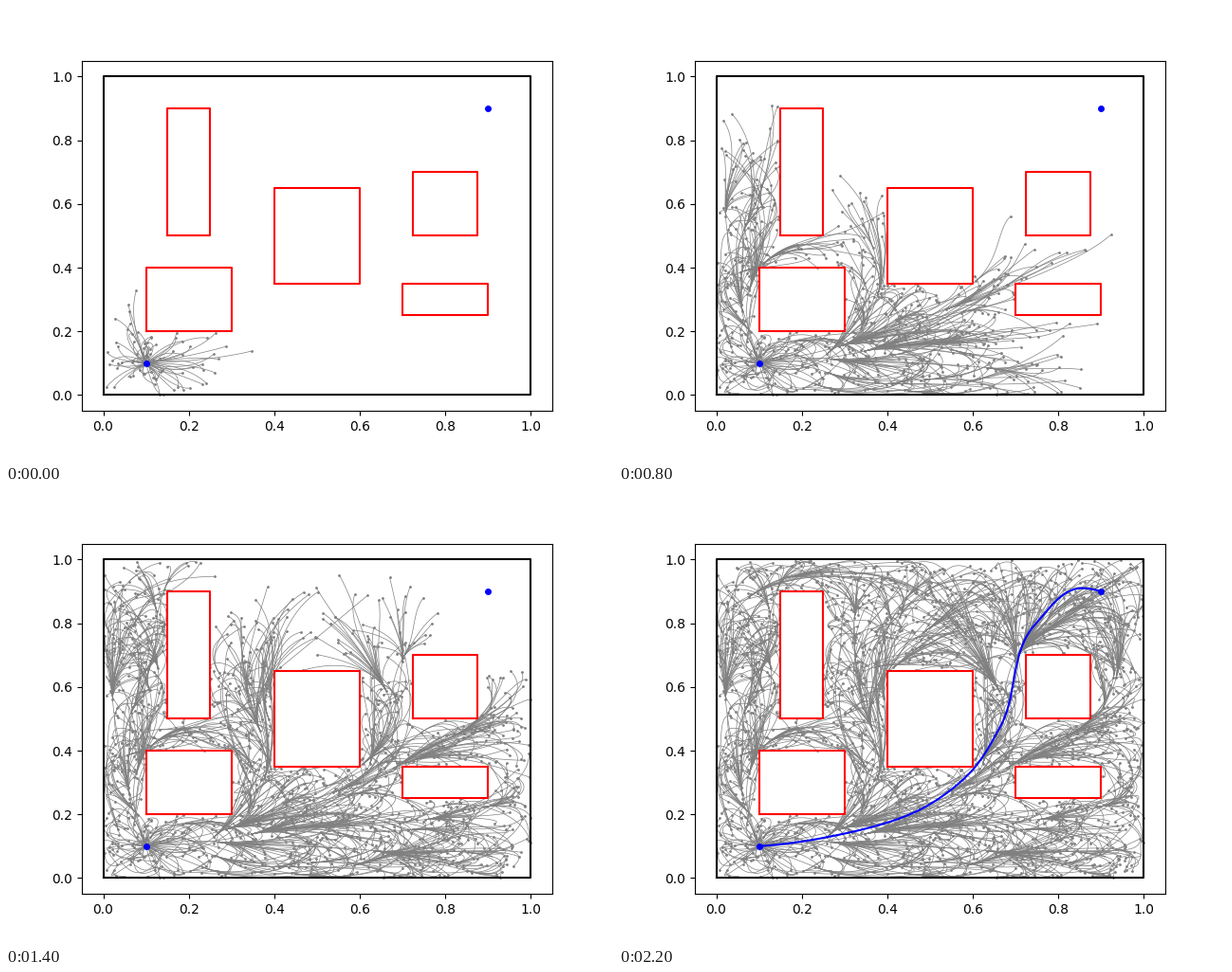
A matplotlib script for the animation above (2.4 s loop, 640x480 px).

```python
import numpy as np
import matplotlib.pyplot as plt
from matplotlib.animation import FuncAnimation
from matplotlib.collections import LineCollection

FRAMES, INTERVAL = 12, 200
COUNT, V_MAX, RADIUS = 2000, 0.33, 1.2
START, GOAL = (0.1, 0.1), (0.9, 0.9)

# Obstacles as x0, y0, x1, y1
BOXES = [(0.15, 0.5, 0.25, 0.9), (0.1, 0.2, 0.3, 0.4), (0.4, 0.35, 0.6, 0.65),
         (0.725, 0.5, 0.875, 0.7), (0.7, 0.25, 0.9, 0.35)]

ROUTE = np.array([START, (0.25, 0.126), (0.5, 0.232), (0.593, 0.33),
                  (0.664, 0.475), (0.748, 0.8), (0.855, 0.91), GOAL])


def blocked(p):
    """Mask of points that lie outside the room or inside an obstacle."""
    x, y = p[..., 0], p[..., 1]
    bad = (x < 0) | (x > 1) | (y < 0) | (y > 1)
    for x0, y0, x1, y1 in BOXES:
        bad |= (x > x0) & (x < x1) & (y > y0) & (y < y1)
    return bad


def hermite(p0, m0, p1, m1, n=20):
    """Cubic curves for stacked end points and end tangents."""
    s = np.linspace(0, 1, n)[:, None]
    p0, m0, p1, m1 = (a[:, None, :] for a in (p0, m0, p1, m1))
    return ((2 * s**3 - 3 * s**2 + 1) * p0 + (s**3 - 2 * s**2 + s) * m0
            + (3 * s**2 - 2 * s**3) * p1 + (s**3 - s**2) * m1)


def sample_states():
    """Random free positions with velocities; the start at rest comes first."""
    rng = np.random.default_rng(4)
    pos = rng.uniform(0, 1, (2 * COUNT, 2))
    pos = pos[~blocked(pos)][:COUNT]
    vel = rng.uniform(-V_MAX, V_MAX, pos.shape)
    return np.vstack([START, GOAL, pos]), np.vstack([np.zeros((2, 2)), vel])


def steer_costs(pos, vel):
    """Best time + energy cost and duration between all pairs of states."""
    d = pos[None] - pos[:, None]
    dist = (d**2).sum(-1)
    along = (d * (vel[:, None] + vel[None])).sum(-1)
    sq = (vel**2).sum(-1)
    speed = sq[:, None] + sq[None] + vel @ vel.T
    best = np.full(dist.shape, np.inf)
    time = np.zeros(dist.shape)
    for t in np.linspace(0.06, RADIUS, 26):
        c = t + 12 * dist / t**3 - 12 * along / t**2 + 4 * speed / t
        better = c < best
        best[better] = c[better]
        time[better] = t
    best[best > RADIUS] = np.inf
    np.fill_diagonal(best, np.inf)
    return best, time


def grow_tree(pos, vel):
    """Fast marching tree: curves, tips and the wave cost that added each."""
    cost_to, time = steer_costs(pos, vel)
    cost_from = cost_to.T.copy()
    n = len(pos)
    cost = np.full(n, np.inf)
    cost[0] = 0
    fresh = np.ones(n, bool)
    fresh[0] = False
    front = ~fresh
    curves, tips, births = [], [], []
    while front.any():
        z = np.argmin(np.where(front, cost, np.inf))
        near = np.flatnonzero(fresh & np.isfinite(cost_to[z]))
        if len(near):
            total = cost_from[near] + np.where(front, cost, np.inf)
            par = total.argmin(1)
            t = time[par, near][:, None]
            arcs = hermite(pos[par], t * vel[par], pos[near], t * vel[near])
            ok = ~blocked(arcs).any(1)
            new = near[ok]
            cost[new] = total.min(1)[ok]
            fresh[new] = False
            front[new] = True
            curves.extend(arcs[ok])
            tips.extend(pos[new])
            births.extend([cost[z]] * len(new))
        front[z] = False
    return curves, np.array(tips), np.array(births)


def smooth(pts):
    s = np.r_[0, np.cumsum(np.hypot(*np.diff(pts, axis=0).T))]
    m = np.gradient(pts, s, axis=0, edge_order=2)
    h = np.diff(s)[:, None]
    return hermite(pts[:-1], h * m[:-1], pts[1:], h * m[1:]).reshape(-1, 2)


def draw_box(x0, y0, x1, y1, color):
    ax.plot([x0, x1, x1, x0, x0], [y0, y0, y1, y1, y0], color=color, lw=1.5)


curves, tips, births = grow_tree(*sample_states())
last_wave = np.quantile(births, 0.98)

fig, ax = plt.subplots(figsize=(6.4, 4.8), dpi=100)
ax.set_xlim(-0.05, 1.05)
ax.set_ylim(-0.05, 1.05)
draw_box(0, 0, 1, 1, "black")
for box in BOXES:
    draw_box(*box, "red")

branches = LineCollection([], colors="gray", linewidths=0.5, zorder=1)
ax.add_collection(branches, autolim=False)
dots, = ax.plot([], [], "o", color="gray", ms=1, zorder=1.5)
route, = ax.plot(*smooth(ROUTE).T, color="blue", lw=1.5, zorder=3)
ax.plot(*zip(START, GOAL), "o", color="blue", ms=4, zorder=4)


def update(i):
    wave = last_wave * (i / (FRAMES - 1)) ** 0.78
    shown = np.searchsorted(births, wave, side="right")
    branches.set_segments(curves[:shown])
    dots.set_data(tips[:shown, 0], tips[:shown, 1])
    route.set_visible(i == FRAMES - 1)
    return branches, dots, route


anim = FuncAnimation(fig, update, frames=FRAMES, interval=INTERVAL,
                     repeat=True, repeat_delay=0)
plt.show()
```
